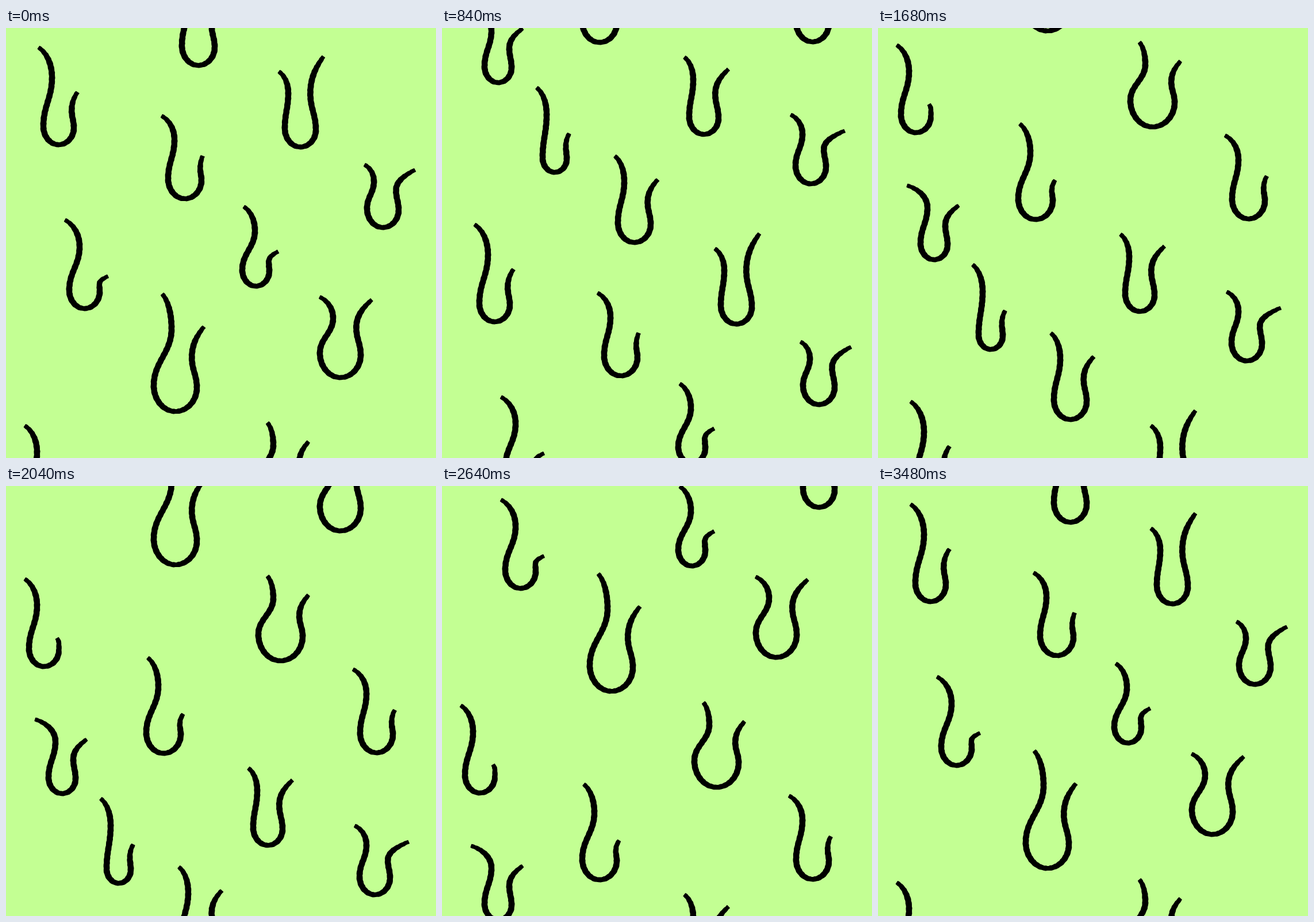
These frames come from a looping animation (748x748 px, 3.54 s). An HTML page:

```html
<!DOCTYPE html>
<html lang="en">
<head>
<meta charset="utf-8">
<title>Falling squiggles</title>
<style>
  html, body { margin: 0; width: 100%; height: 100%; overflow: hidden; background: #c3ff93; }
  svg { display: block; width: 100%; height: 100%; }
  #scroll { animation: fall 3540ms steps(59) infinite; }
  #tile path { stroke: #000; stroke-width: 1.6; stroke-linejoin: round; }
  @keyframes fall { to { transform: translateY(1298px); } }
</style>
</head>
<body>
<svg viewBox="0 0 748 748">
  <g id="scroll">
    <g id="tile"></g>
    <use href="#tile" y="-1278"/>
  </g>
</svg>
<script>
  // Key points of each hook: start x y, bulge x, cup left right bottom, tip x y
  const hooks = [
    [57, 34, 80, 65, 118, 203, 124, 112],
    [475, 76, 491, 485, 539, 207, 552, 50],
    [271, 153, 293, 282, 340, 297, 342, 223],
    [624, 238, 640, 628, 683, 347, 711, 247],
    [414, 311, 433, 411, 458, 449, 473, 389],
    [103, 334, 128, 110, 163, 488, 177, 432],
    [272, 463, 288, 257, 332, 667, 344, 520],
    [546, 468, 569, 546, 617, 608, 636, 473],
    [33, 692, 54, 40, 92, 844, 89, 795],
    [455, 687, 465, 439, 516, 834, 526, 720],
    [301, -85, 317, 306, 363, 65, 375, -44],
    [607, -157, 627, 615, 668, -37, 700, -129],
    [165, -204, 182, 175, 217, -57, 221, -124],
    [422, -257, 437, 430, 481, -123, 498, -236],
    [51, -342, 86, 74, 121, -213, 140, -307],
    [247, -449, 265, 244, 304, -283, 308, -351],
    [604, -429, 627, 616, 673, -284, 676, -358]
  ];

  // Centre line: vertical at the bulge, cup sides and neck, level at the bottom
  function centreLine([sx, sy, ux, lx, rx, by, tx, ty]) {
    const w = rx - lx, bx = lx + w / 2;
    const ly = by - 0.6 * w, ry = by - 0.55 * w;
    const uy = sy + 0.38 * (ly - sy);
    const ny = (ry + ty) / 2, nx = rx - 0.09 * (by - ty - 50);
    const mix = (a, b, t) => a + (b - a) * t;
    const bend = (x1, y1, x2, y2) =>
      `C${x1} ${mix(y1, y2, 0.42)} ${x2} ${mix(y1, y2, 0.58)} ${x2} ${y2}`;
    return `M${sx} ${sy}` +
      `C${mix(sx, ux, 0.6)} ${mix(sy, uy, 0.18)} ${ux} ${mix(sy, uy, 0.55)} ${ux} ${uy}` +
      bend(ux, uy, lx, ly) +
      `C${lx} ${mix(ly, by, 0.55)} ${mix(lx, bx, 0.45)} ${by} ${bx} ${by}` +
      `C${mix(bx, rx, 0.55)} ${by} ${rx} ${mix(by, ry, 0.45)} ${rx} ${ry}` +
      bend(rx, ry, nx, ny) +
      `C${nx} ${mix(ny, ty, 0.45)} ${mix(nx, tx, 0.5)} ${mix(ny, ty, 0.75)} ${tx} ${ty}`;
  }

  // Brush outline: heavier on verticals, tapered tips, slightly rough edge
  function brush(path) {
    const total = path.getTotalLength(), count = Math.round(total / 3);
    const left = [], right = [];
    for (let i = 0; i <= count; i++) {
      const d = total * i / count;
      const c = path.getPointAtLength(d);
      const p = path.getPointAtLength(Math.max(0, d - 1));
      const q = path.getPointAtLength(Math.min(total, d + 1));
      const len = Math.hypot(q.x - p.x, q.y - p.y);
      const dx = (q.x - p.x) / len, dy = (q.y - p.y) / len;
      const tip = Math.min(1, d / 32, (total - d) / 32);
      const half = (3.4 + 1.1 * Math.abs(dy)) * (0.68 + 0.32 * tip);
      const l = half + 0.3 * Math.sin(i * 1.9);
      const r = half + 0.3 * Math.sin(i * 2.3);
      left.push([c.x - dy * l, c.y + dx * l]);
      right.unshift([c.x + dy * r, c.y - dx * r]);
    }
    return 'M' + [...left, ...right].map(p => p.join(' ')).join('L') + 'Z';
  }

  const tile = document.getElementById('tile');
  for (const hook of hooks) {
    const path = document.createElementNS('http://www.w3.org/2000/svg', 'path');
    path.setAttribute('d', centreLine(hook));
    tile.append(path);
    path.setAttribute('d', brush(path));
  }
</script>
</body>
</html>
```
